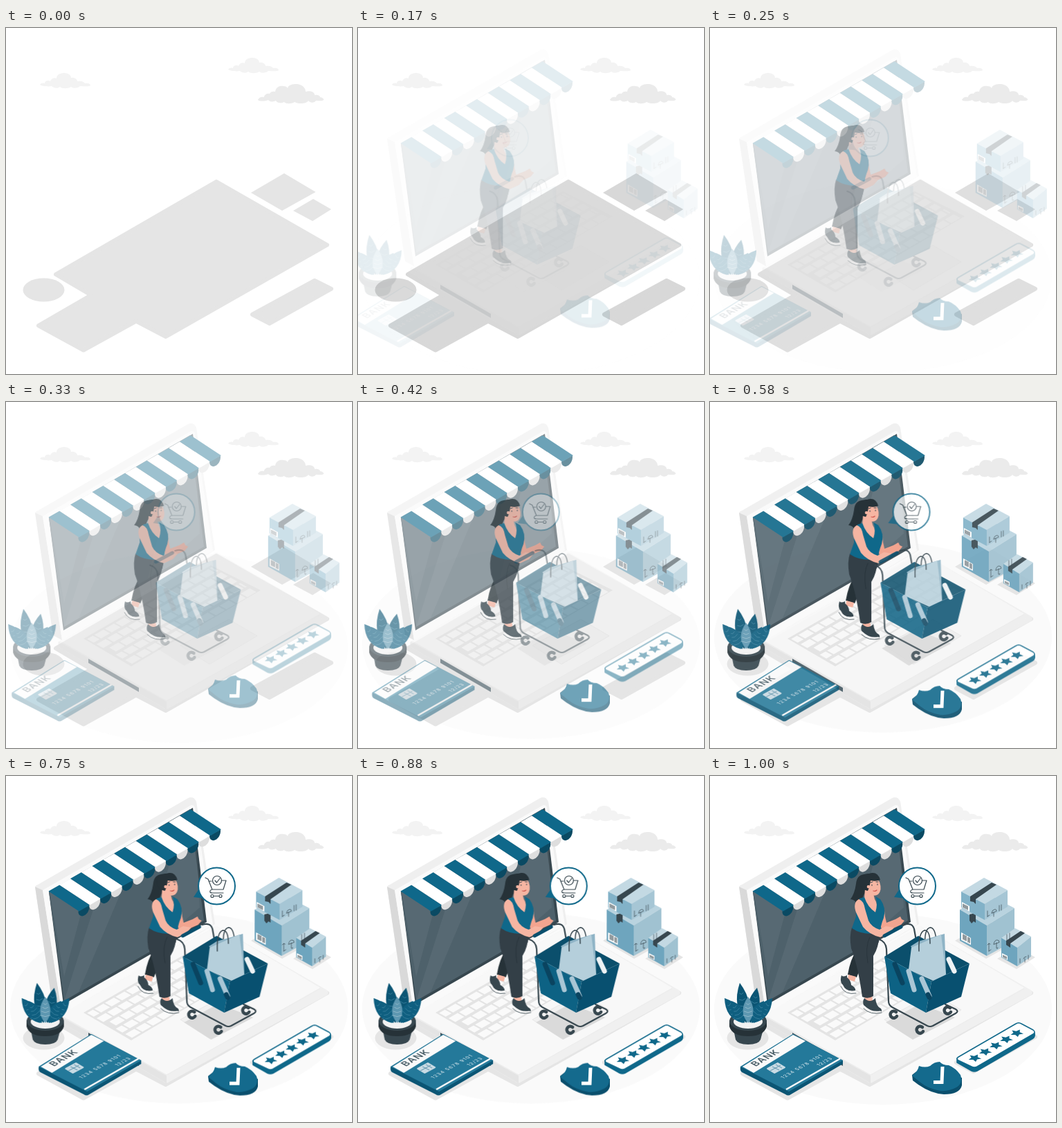
An HTML page that plays this animation: 500 px wide and 500 px high, repeating every 1.04 s.

```html
<!DOCTYPE html>
<html lang="en">
<head>
<meta charset="utf-8">
<title>Online shop</title>
<style>
html, body { margin: 0; width: 100%; height: 100%; overflow: hidden; background: #fff; }
svg { display: block; width: 100vw; height: 100vh; }
.in {
  --x: 0px; --y: 0px;
  --move: cubic-bezier(.36, -.01, .5, 1.38);
  --fade: var(--move);
  animation: slide 1040ms infinite both, fade 1040ms infinite both;
  animation-timing-function: var(--move), var(--fade);
}
.early { --fade: cubic-bezier(.3, 0, .45, 1.5); }
.late { --fade: cubic-bezier(.5, -.04, .5, 1.4); }
.last { --fade: cubic-bezier(.58, -.05, .55, 1.35); }
#shadows { animation: shade 1040ms linear infinite; }
@keyframes slide { from { transform: translate(var(--x), var(--y)); } 93.5%, to { transform: none; } }
@keyframes fade { from { opacity: 0; } 93.5%, to { opacity: 1; } }
@keyframes shade {
  0%, 7.6% { fill: #e5e5e5; stroke: #e5e5e5; }
  16.3% { fill: #d8d8d8; stroke: #d8d8d8; }
  31.7%, 100% { fill: #e5e5e5; stroke: #e5e5e5; }
}
.line { fill: none; stroke: #37474f; stroke-linecap: round; stroke-linejoin: round; }
text { font-family: Inter, "Noto Sans", sans-serif; }
</style>
</head>
<body>
<svg viewBox="0 0 500 500">
  <defs>
    <path id="cloud" fill="#f3f3f3" d="M0 17C1 14 6 14 7 15C7 11 13 10 15 12C16 8 21 6 24 8C24 2 30 0 35 0C41 0 45 3 45 7C50 6 54 9 54 12C60 11 64 13 65 15C68 14 73 15 73 18C72 20 62 19 58 19C55 22 48 23 45 20C41 23 32 23 29 20C26 23 20 22 17 19C12 20 3 19 0 17Z"/>
    <clipPath id="glass"><path d="M62 167L270 46L290 211L83 330Z"/></clipPath>
  </defs>

  <ellipse class="in" style="--y:30px" cx="250" cy="337" rx="244" ry="138" fill="#fafafa"/>

  <g id="shadows" stroke-width="6" stroke-linejoin="round">
    <path d="M304 222L464 313.5L231 446L188 423.5L112 465.5L47 430L123 386L72 356Z"/>
    <path d="M446 365L470 377L381 427L356 414Z"/>
    <g stroke="none" stroke-width="0">
      <ellipse cx="54.5" cy="378.5" rx="30" ry="17"/>
      <path d="M402 210L447.5 237L399 264L354 238ZM444 247L470 262L443 279L415 264Z"/>
    </g>
  </g>

  <use href="#cloud" x="49" y="65"/>
  <use href="#cloud" x="321" y="43"/>
  <path transform="translate(364 81)" fill="#ebebeb" d="M0 23C1 19 6 18 9 19C9 15 14 13 17 14C18 11 22 10 25 11C26 4 32 2 37 3C40 3 42 4 43 6C44 1 50 0 56 0C63 0 69 5 69 11C75 9 82 11 82 16C86 15 90 17 90 19C93 19 96 22 95 23C93 25 87 24 84 24C82 27 76 28 73 24C70 29 58 29 53 26C48 29 41 29 38 26C34 28 28 28 26 24C22 26 17 26 15 23C10 25 2 25 0 23Z"/>

  <!-- laptop -->
  <g class="in">
    <path fill="#f0f0f0" d="M76 346L304 217L463 309Q469 313 463 317L236 442Q232 445 228 442L78 355Q74 351 76 346Z"/>
    <path fill="#e4e4e4" d="M76 346L232 433V444L78 355Q74 351 76 346Z"/>
    <path fill="#f8f8f8" d="M78 345L304 217L454 306L232 432Z"/>
    <path fill="none" stroke="#ececec" d="M80 347L232 432L454 307"/>
    <path fill="#efefef" d="M42 161Q42 158 46 157L263 32Q271 28 275 37L302 214L80 344L68 337Z"/>
    <path fill="#d9d9d9" d="M42 160L53 165L81 344L68 337Z"/>
    <path fill="#fafafa" d="M53 165L266 43Q271 40 273 46L299 215L81 344Z"/>
    <path fill="#37474f" d="M62 167L270 46L290 211L83 330Z"/>
    <path fill="#4e616b" d="M62 167L266 48L286 209L84 325Z"/>
    <g clip-path="url(#glass)" fill="#fff" opacity=".05">
      <path d="M62 160L112 185L84 290ZM135 165L178 140L105 312L84 325ZM240 110L275 88L280 190L205 255Z"/>
    </g>
    <g id="awning"></g>
    <path fill="#e4e4e4" d="M112 342L296 236L368 272L181 382Z"/>
    <g id="keys" fill="#fafafa"></g>
    <path fill="#f1f1f1" stroke="#e8e8e8" d="M252 352L322 314L363 338L294 379Z"/>
    <path fill="#455a64" d="M119 371L192 413V419L119 377Z"/>
  </g>

  <!-- boxes -->
  <g class="in" style="--x:30px">
    <path fill="#b9d3df" d="M361 193L400 170L440 191L400 216Z"/>
    <path fill="#6ea5be" d="M361 193L400 216V260L361 238Z"/>
    <path fill="#a0c2d1" d="M400 216L440 191V238L400 260Z"/>
    <path fill="#37474f" d="M375 200L384 198V212L381 210L378 213L375 209Z"/>
    <path fill="#c3d9e3" d="M363 167L396 147L430 165L397 185Z"/>
    <path fill="#82b2c8" d="M363 167L397 185V208L363 190Z"/>
    <path fill="#a6c6d5" d="M397 185L430 165V189L397 208Z"/>
    <path fill="#37474f" d="M376 174L407 154L414 157L384 178V185L381 182L376 181Z"/>
    <path fill="#c3d9e3" d="M421 234L441 220L464 232L444 248Z"/>
    <path fill="#6ea5be" d="M421 234L444 248V275L421 262Z"/>
    <path fill="#a0c2d1" d="M444 248L464 232V261L444 275Z"/>
    <path fill="#37474f" d="M428 238L449 224L455 227L434 242V248L428 244Z"/>
    <path fill="#fff" d="M364 182L375 188V196L364 190ZM363 226L377 234V244L363 237ZM422 256L430 260V266L422 262Z"/>
    <path class="line" stroke-width="1.1" stroke-linecap="butt" d="M366 185v5M368 186v5M370 187v5M372 188v5M366 229v7M368 230v7M370 231v7M373 233v7M375 234v7M424 259v3M426 260v3M428 261v3"/>
    <path class="line" stroke-width=".7" d="M403 242v11M401 244l2-2 2 1M403 253l3-2M410 243q1-6 5-6q3 0 3 3zM414 241v8q2 1 2-1M429 229v11M433 227v11M401 195v8M401 203l3-2M407 198q1-5 4-5q3-1 3 2zM410 197v6M418 187v8M421 186v8M448 264v6M453 264q1-3 4-3M455 264v5M460 259v6"/>
  </g>

  <!-- plant -->
  <g class="in" style="--x:-30px">
    <path fill="#37474f" d="M34 366L37 381Q40 388 55 388Q70 388 73 381L77 366Z"/>
    <path fill="#263238" d="M28 353V362Q32 376 55 376Q78 376 82 362V353Z"/>
    <ellipse cx="55" cy="354" rx="27" ry="14" fill="#37474f"/>
    <ellipse cx="55" cy="355" rx="21" ry="10" fill="#f2f2f2"/>
    <g id="leaves"></g>
  </g>

  <!-- card -->
  <g class="in late" style="--x:-60px">
    <path fill="#0b5574" d="M44 420L120 373L192 411V416L117 460Q113 463 109 460L46 428Q43 426 44 420Z"/>
    <path fill="#24799a" d="M44 420L120 373L192 411L114 456Z"/>
    <path fill="#fafafa" d="M47 420L120 374L138 383L63 429Z"/>
    <path fill="none" stroke="#fafafa" stroke-width="2.5" d="M110 453L188 408.5"/>
    <path fill="#c9dbe4" stroke="#c9dbe4" stroke-width="2" stroke-linejoin="round" d="M83 423L98 415L108 421L93 429Z"/>
    <path fill="none" stroke="#5d93ac" d="M87 426L102 418M90 420L100 425M95 417L104 422"/>
    <g font-weight="600">
      <text transform="matrix(.85 -.5 .88 .47 66 420)" font-size="13.5" letter-spacing=".9" fill="#455a64">BANK</text>
      <g font-size="7.2" font-weight="400" fill="#e4eef3">
        <text transform="matrix(.87 -.5 .88 .47 106 437.5)" letter-spacing="1">1234 5678 9101</text>
        <text transform="matrix(.87 -.5 .88 .47 158 419.5)" letter-spacing=".8">12/23</text>
      </g>
    </g>
  </g>

  <!-- shield -->
  <g class="in" style="--y:-30px">
    <path fill="#0a4f6d" d="M292 432L302 424L364 436V447Q361 460 338 460Q320 459 301 446L293 440Z"/>
    <path fill="#146a8d" d="M302 419Q311 422 318 419Q324 413 332 413Q336 418 345 418Q355 422 362 432Q366 444 356 450Q345 456 333 455Q315 452 303 442L292 433Q300 428 302 419Z"/>
    <path fill="none" stroke="#fff" stroke-width="5" d="M336 420L335 442.5H323"/>
  </g>

  <!-- rating -->
  <g class="in late" style="--y:-60px" stroke="#0f688a" stroke-width="1.5" stroke-linejoin="round">
    <path fill="#0f688a" d="M357 408V414L378 426Q382 428 386 426L467 379Q470 377 469 371Z"/>
    <path fill="#fff" d="M359 406L442 358Q446 355.500 450 358L467 367Q471 370 467 373L386 420Q382 422 378 420L359 411Q355 408.500 359 406Z"/>
    <g id="stars" fill="#0f688a" stroke="none"></g>
  </g>

  <!-- shopper -->
  <g class="in early" style="--x:-30px">
    <path fill="#263238" d="M223 142Q212 143 211 156Q209 170 203 178Q210 179 211 184Q219 184 222 172L236 150Z"/>
    <path fill="#f2a48f" d="M245 178Q252 188 253 203L255 212L268 207L275 203L277 207L281 209L276 215L253 225Q246 222 245 210Z"/>
    <path fill="#263238" d="M218 235L246 230Q243 250 229 263Q217 275 212 291L199 287Q203 264 211 254Z"/>
    <path fill="#f6b5a2" d="M200 287L211 290L209 297L199 294ZM223 316L234 316L235 325L224 325Z"/>
    <path fill="#37474f" d="M198 288Q192 291 190 288Q187 297 192 302Q197 313 210 310Q211 306 204 302Q204 296 198 291Z"/>
    <path class="line" style="stroke:#f4f4f4" stroke-width="3" d="M190 302Q195 314 210 312"/>
    <path class="line" stroke-width=".8" d="M189 304Q195 317 211 314"/>
    <path fill="#333f47" d="M205 219Q201 231 204 249Q214 275 220 319Q228 323 236 318Q236 285 236 260Q244 248 245 227Z"/>
    <path class="line" style="stroke:#263238" stroke-width=".7" d="M231 233Q224 246 228 270"/>
    <path fill="#37474f" d="M223 321Q220 326 222 331Q232 341 245 342Q250 340 247 336Q240 333 239 321Q231 329 223 321Z"/>
    <path class="line" style="stroke:#f4f4f4" stroke-width="3" d="M223 334Q232 343 246 341"/>
    <path class="line" stroke-width=".8" d="M222 336Q232 346 248 342"/>
    <path fill="#f6b5a2" d="M224 163L223 177Q226 188 240 198Q243 185 238 178L236 170Z"/>
    <path fill="#0f688a" d="M223 175L216 177Q210 190 211 203L205 220Q221 231 246 227Q246 217 251 205Q255 190 246 178L239 174Q243 184 239 197Q228 190 223 175Z"/>
    <path fill="#f6b5a2" d="M215 178Q206 183 211 197L221 218Q230 229 246 233L259 227L266 219L254 217L245 222Q233 218 229 209L224 192Q222 180 215 178Z"/>
    <path fill="#f6b5a2" d="M226 149Q239 144 245 153Q249 165 243 171Q236 176 227 167Z"/>
    <path fill="#263238" d="M216 151Q219 140 230 141Q242 137 246 150Q240 153 232 151Q231 160 228 166Q216 164 216 151Z"/>
    <path class="line" stroke-width="1" d="M234 157v1.5M242 156v1.5M232 154l3-1M240 153l3 0"/>
    <path class="line" style="stroke:#d05a50" stroke-width="1.3" d="M236 166q3 1 5-1"/>
    <circle cx="229" cy="160" r="2.3" fill="#f6b5a2"/>
  </g>

  <!-- cart -->
  <g class="in late" style="--x:-60px">
    <path fill="#dadada" d="M254 356L304 329L354 349L293 381Z"/>
    <path class="line" stroke-width="2.2" d="M244 236Q254 239 255 250L258 325Q258 331 263 334L314 361Q318 363 322 361L355 343Q360 340 355 337L340 330M280 215Q292 211 295 221L298 238"/>
    <path class="line" stroke-width="4.500" d="M269 341a5 5 0 1 0 1 6M307 363a5 5 0 1 0 1 6M347 335a5 5 0 1 0 1 6"/>
    <path class="line" style="stroke:#0a4f6d" stroke-width="5" d="M252 231L276 218"/>
    <path fill="#0b4f6c" d="M252 261L301 231L375 271L320 297Z"/>
    <path class="line" stroke-width="1.5" d="M311 247Q309 221 318 219Q326 219 327 240"/>
    <path fill="#8fb4c6" d="M290 246L301 239L339 228L341 287L324 296Z"/>
    <path fill="#b5cfdb" d="M291 248L334 229L341 287L325 297L287 280Z"/>
    <path class="line" stroke-width="1.5" d="M302 253Q301 226 310 223Q318 223 318 242"/>
    <path fill="#0d6284" d="M252 261L320 297L312 342L261 314Z"/>
    <path fill="#085070" d="M320 297L375 271L363 319L312 342Z"/>
    <g fill="none" stroke-linecap="round" stroke-width="7">
      <path stroke="#0a4460" d="M267 272L278 299"/>
      <path stroke="#a9c6d5" d="M287 282L295 309M306 293L317 318"/>
      <path stroke="#eef3f5" d="M345 265L353 282"/>
      <path stroke="#0a4460" d="M315 316L317 320"/>
    </g>
  </g>

  <!-- bubble -->
  <g class="in last" style="--x:-90px">
    <path fill="#0f688a" d="M274 163L266 175L282 177Z"/>
    <circle cx="299.5" cy="159" r="26.5" fill="#fff" stroke="#0f688a" stroke-width="2"/>
    <g class="line" stroke-width="1.2">
      <path d="M283 147L287 149L293 164H309L313 151H307M288 152H292M293 164Q289 165 290 168Q291 169 293 169H309M297 151L299.5 154L304 148M296 173.5H302"/>
      <circle cx="300" cy="151" r="6.5"/>
      <circle cx="293" cy="173.5" r="2"/>
      <circle cx="305" cy="173.5" r="2"/>
    </g>
  </g>
</svg>
<script>
const put = (id, html) => { document.getElementById(id).innerHTML = html; };
const range = n => [...Array(n).keys()];
const path = (d, fill = '') => `<path d="${d}"${fill && ` fill="${fill}"`}/>`;

// Awning: 13 slanted stripes, each ending in a hanging scallop
const [dx, dy] = [15.8, -9.1];
put('awning', range(13).map(i => {
  const x = 61.5 + i * dx, y = 166.5 + i * dy, blue = i % 2 === 0;
  return path(`M${x + 43} ${y + 29}l${dx} ${dy}c1 8 -4 15 -10 16c-4 0 -6 -3 -5.8 -6.9z`, blue ? '#0a4a63' : '#dedede')
    + path(`M${x} ${y}l${dx} ${dy}l44 29l${-dx} ${-dy}z`, blue ? '#0f688a' : '#fff');
}).join(''));

// Keyboard: u runs along the back, v toward the front
const at = (u, v) => `${114 + 182 * u + 69 * v} ${342 - 105 * u + 38 * v}`;
put('keys', range(5).map(r => range(13).map(c => {
  const shift = (r % 3) * .3 - .3;
  const a = Math.max(0, (c + shift) / 12) + .006, b = Math.min(1, (c + 1 + shift) / 12) - .006;
  const v = r / 5 + .03, w = (r + 1) / 5 - .03;
  return b > a ? path(`M${at(a, v)}L${at(b, v)}L${at(b, w)}L${at(a, w)}Z`) : '';
}).join('')).join(''));

// Leaves fan out from the pot
const leaf = (tx, ty, w, fill, vein) => {
  const x = 55 + (tx - 55) * .22, y = 357, len = Math.hypot(tx - x, ty - y);
  const nx = -(ty - y) / len * w, ny = (tx - x) / len * w;
  const mx = x + (tx - x) * .45, my = y + (ty - y) * .45;
  const veins = [.3, .45, .6, .75].map(k => {
    const px = x + (tx - x) * k, py = y + (ty - y) * k, s = (1 - k) * .7;
    return `M${px - nx * s} ${py - ny * s}L${px} ${py + 2}L${px + nx * s} ${py + ny * s}`;
  }).join('');
  return path(`M${x} ${y}Q${mx + nx} ${my + ny} ${tx} ${ty}Q${mx - nx} ${my - ny} ${x} ${y}Z`, fill)
    + `<path d="${veins}" fill="none" stroke="${vein}" stroke-width=".8"/>`;
};
put('leaves', [[43, 299], [68, 306], [21, 321], [90, 321], [31, 325], [78, 325]]
  .map(([x, y], i) => leaf(x, y, 17, i < 2 ? '#0b5574' : '#0f5f80', '#3f86a3')).join('')
  + leaf(55, 319, 15, '#5d97b1', '#9cc0d0'));

// Five stars lying flat on the plate
const star = (cx, cy) => 'M' + range(10).map(i => {
  const r = i % 2 ? 4 : 8, a = i * Math.PI / 5;
  const u = r * Math.sin(a), v = -r * Math.cos(a);
  return `${cx + .87 * (u + v)} ${cy + .5 * (v - u)}`;
}).join('L') + 'Z';
put('stars', range(5).map(i => path(star(382.5 + i * 15.2, 407.5 - i * 9))).join(''));
</script>
</body>
</html>
```
